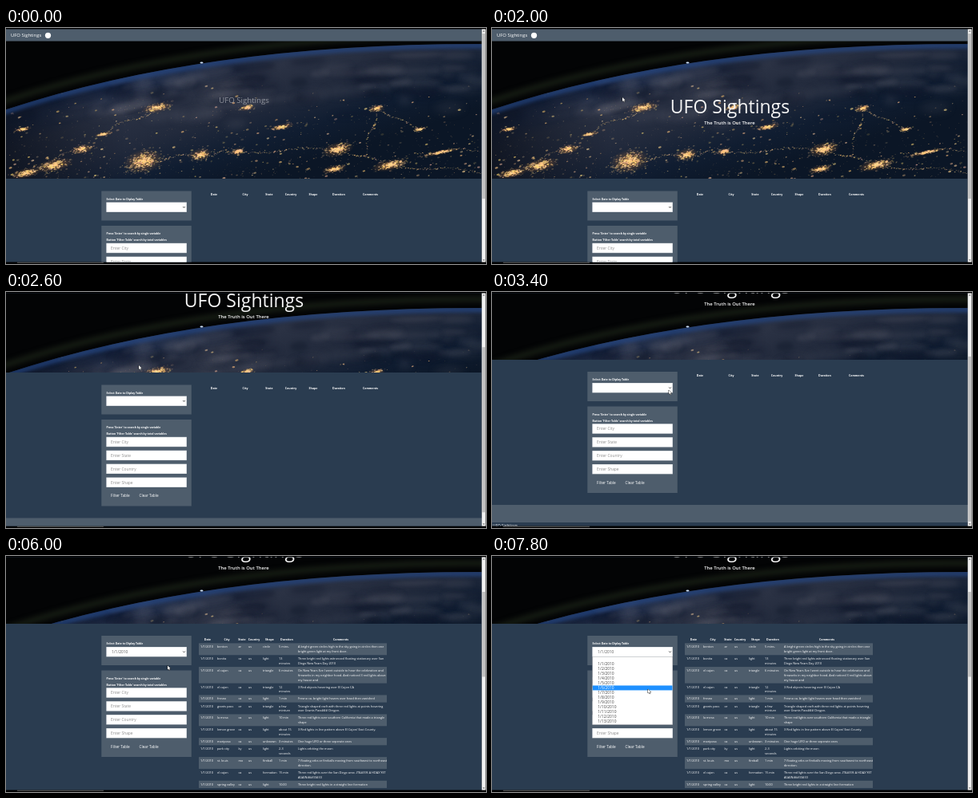
An HTML page with a canvas for the animation above (8 s loop, 600 px wide and 296 px high).

```html
<!DOCTYPE html>
<html lang="en">
<head>
<meta charset="utf-8">
<title>UFO Sightings</title>
<style>
html, body { margin: 0; width: 100%; height: 100%; overflow: hidden; background: #000; }
canvas { display: block; }
</style>
</head>
<body>
<canvas id="stage" width="600" height="296"></canvas>
<script>
const ctx = document.getElementById('stage').getContext('2d');
const LOOP = 8000, STEP = 200;
const BODY = '#2a3c50', PANEL = '#4e5d6c';
const VIEW = { top: 1.4, bottom: 293.6, right: 594.7 };
const LIST_TOP = 126.7, ROW = 5.96;

// Each key is [time, ...values].
const scrollKeys = [[2000, 0], [2200, 21], [2400, 52], [2600, 88], [2800, 104.5]];
const cursorKeys = [
  [1400, 150, 62], [2000, 163, 87], [2400, 164, 90], [2800, 168, 94], [3400, 221, 123],
  [4400, 222, 121], [5200, 202, 134.5], [6000, 202, 137.5], [6800, 204, 136],
  [7200, 221, 120], [7800, 195, 167]
];

const plainHeads = [['Date', 260], ['City', 299], ['State', 329], ['Country', 356],
  ['Shape', 384], ['Duration', 416], ['Comments', 455.5]];
const tableHeads = [['Date', 252], ['City', 276], ['State', 295], ['Country', 310],
  ['Shape', 329.5], ['Duration', 351], ['Comments', 418.5]];
const columns = [264, 290.5, 303, 321, 341, 365];

// City; state; country; shape; duration; comment. A bar marks a line break.
const sightings = [
  'benton;ar;us;circle;5 mins.;A bright green circles high in the sky going in circles then one|bright green light at my front door.',
  'bonita;ca;us;light;13|minutes;Three bright red lights witnessed floating stationary over San|Diego New Years Day 2010',
  'el cajon;ca;us;triangle;6 minutes;On New Years Eve I went outside to hear the celebration and|fireworks in my neighbor hood. And noticed 3 red lights above|my house and',
  'el cajon;ca;us;triangle;12|minutes;3 Red objects hovering over El Cajon CA',
  'fresno;ca;us;light;1 min;Fresno ca. bright light hovers over head then vanished',
  'grants pass;or;us;triangle;a few|minture;Triangle shaped craft with three red lights at points hovering|over Grants Pass### Oregon.',
  'la mesa;ca;us;light;10 min;Three red lights over southern California that made a triangle|shape',
  'lemon grove;ca;us;light;about 15|minutes;3 Red lights in line pattern above El Cajon/ East County.',
  'mariposa;ca;us;unknown;3 minutes;One huge UFO or three seperate ones',
  'park city;ky;us;light;2-3|seconds;Lights orbiting the moon',
  'st. louis;mo;us;fireball;1 min;7 floating orbs or fireballs moving from southwest to northeast|direction.',
  'el cajon;ca;us;formation;15 min;Three red lights over the San Diego area -IT&#39S A HOAX YET|AGAIN###33#33',
  'spring valley;ca;us;light;10:00;Three bright red lights in a straight line formation',
  'el cajon;ca;us;light;5 min;Three red lights in the sky'
].map(row => row.split(';').map(cell => cell.split('|')));

function track(keys, t) {
  if (t <= keys[0][0]) return keys[0].slice(1);
  for (let i = 1; i < keys.length; i++) {
    const [a, b] = [keys[i - 1], keys[i]];
    if (t <= b[0]) {
      const k = (t - a[0]) / (b[0] - a[0]);
      return a.slice(1).map((v, n) => v + (b[n + 1] - v) * k);
    }
  }
  return keys[keys.length - 1].slice(1);
}

const clamp = (v, lo, hi) => Math.min(hi, Math.max(lo, v));

function box(x, y, w, h, color, g = ctx) {
  g.fillStyle = color;
  g.fillRect(x, y, w, h);
}

// y is the visual middle of the line.
function text(str, x, y, size, { color = '#fff', weight = 400, align = 'left' } = {}) {
  ctx.font = `${weight} ${size}px "Open Sans", "Noto Sans", sans-serif`;
  ctx.textAlign = align;
  ctx.fillStyle = color;
  ctx.fillText(str, x, y + size * 0.36);
}

function seeded(seed) {
  return () => (seed = (seed * 16807) % 2147483647) / 2147483647;
}

function paintEarth() {
  const canvas = document.createElement('canvas');
  canvas.width = 600;
  canvas.height = 192;
  const g = canvas.getContext('2d');
  const rand = seeded(4711);
  const spread = () => rand() + rand() + rand() - 1.5;
  box(0, 0, 600, 192, '#030405', g);

  const horizon = dy => {
    g.beginPath();
    g.moveTo(-5, 104 + dy);
    g.quadraticCurveTo(250, 18 + dy, 605, 20 + dy);
  };
  const rim = (dy, width, color, blur) => {
    g.filter = `blur(${blur}px)`;
    horizon(dy);
    g.strokeStyle = color;
    g.lineWidth = width;
    g.stroke();
    g.filter = 'none';
  };
  rim(-11, 7, '#171d14', 3);

  g.save();
  horizon(0);
  g.lineTo(605, 192);
  g.lineTo(-5, 192);
  g.clip();
  const ground = g.createLinearGradient(250, 30, 300, 192);
  ground.addColorStop(0, '#1c2c4c');
  ground.addColorStop(0.25, '#2b3244');
  ground.addColorStop(0.5, '#222a3c');
  ground.addColorStop(0.75, '#101d31');
  ground.addColorStop(1, '#0b1626');
  box(0, 0, 600, 192, ground, g);

  for (let i = 0; i < 130; i++) {
    const x = rand() * 600, y = 88 - x * 0.035 + spread() * 36;
    g.filter = `blur(${2 + rand() * 4}px)`;
    g.fillStyle = i % 3 ? 'rgba(112,112,124,.17)' : 'rgba(8,16,34,.3)';
    g.beginPath();
    g.ellipse(x, y, 8 + rand() * 26, 2 + rand() * 5, -0.25 + x / 2400, 0, 7);
    g.fill();
  }
  g.filter = 'none';
  const shade = g.createLinearGradient(0, 0, 150, 0);
  shade.addColorStop(0, 'rgba(3,8,18,.65)');
  shade.addColorStop(1, 'rgba(3,8,18,0)');
  box(0, 0, 150, 192, shade, g);
  rim(2, 7, 'rgba(36,70,132,.7)', 2);

  const speck = (x, y, r, a) => {
    g.fillStyle = `rgba(255,${185 + rand() * 40 | 0},${105 + rand() * 60 | 0},${a})`;
    g.beginPath();
    g.ellipse(x, y, r * 1.4, r * 0.8, -0.25, 0, 7);
    g.fill();
  };
  const road = (x1, y1, x2, y2) => {
    const count = Math.hypot(x2 - x1, y2 - y1) * 0.7;
    for (let i = 0; i < count; i++) {
      const k = i / count, bend = Math.sin(k * 7) * 2.5;
      speck(x1 + (x2 - x1) * k + bend + spread(), y1 + (y2 - y1) * k + bend + spread() * 1.5,
        0.3 + rand() * 0.5, 0.15 + rand() * 0.55);
    }
  };
  // City: x, y, half width, half height.
  const cities = [[189, 100, 20, 6], [172, 167, 25, 15], [95, 152, 14, 6], [60, 172, 24, 8],
    [25, 182, 20, 6], [243, 159, 15, 8], [290, 155, 9, 5], [415, 152, 20, 9], [463, 101, 11, 5],
    [480, 172, 24, 7], [21, 127, 11, 3], [345, 124, 16, 4], [543, 156, 24, 3],
    [410, 177, 16, 5], [301, 100, 10, 4], [517, 127, 9, 3], [122, 133, 12, 3]];
  for (const [x, y, w, h] of cities) {
    g.save();
    g.translate(x, y);
    g.rotate(-0.2);
    g.scale(w, h);
    const glow = g.createRadialGradient(0, 0, 0, 0, 0, 1);
    glow.addColorStop(0, 'rgba(255,190,110,.75)');
    glow.addColorStop(0.35, 'rgba(220,140,65,.35)');
    glow.addColorStop(1, 'rgba(180,110,50,0)');
    box(-1, -1, 2, 2, glow, g);
    g.restore();
    for (let i = 0; i < w * h * 0.8 + 15; i++) {
      const angle = rand() * 6.283, reach = rand() * (0.4 + rand());
      const dx = Math.cos(angle) * reach * w;
      speck(x + dx, y + Math.sin(angle) * reach * h - dx * 0.2,
        0.4 + rand() * 0.7, clamp(1.15 - reach, 0.25, 0.95));
    }
  }
  road(10, 188, 108, 146);
  road(172, 167, 243, 159);
  road(243, 159, 290, 155);
  road(290, 155, 415, 152);
  road(415, 152, 480, 172);
  road(480, 172, 600, 182);
  road(463, 101, 450, 160);
  road(463, 101, 517, 127);
  road(189, 100, 122, 133);
  road(510, 157, 590, 153);
  for (let i = 0; i < 1000; i++) {
    const x = rand() * 600, y = 62 + Math.sqrt(rand()) * 128;
    speck(x, y, 0.25 + rand() ** 5 * 1.3, 0.12 + rand() * 0.5);
  }
  g.restore();
  g.fillStyle = '#cfe2ff';
  g.beginPath();
  g.ellipse(244.5, 43.5, 2, 1, 0, 0, 7);
  g.fill();
  return canvas;
}
const earth = paintEarth();

function drawHero(t, scroll) {
  const bottom = 189 - scroll;
  ctx.drawImage(earth, 0, 0, 600, bottom, 0, 0, 600, bottom);
  const grow = clamp(0.42 + t / 1200 * 0.58, 0, 1);
  const settle = (grow - 0.42) / 0.58;
  text('UFO Sightings', 297.5, 91 + 7.5 * settle - scroll, 23 * grow,
    { align: 'center', color: `rgba(245,245,245,${grow ** 0.8})` });
  text('The Truth is Out There', 297, 119 - scroll, 5.9,
    { align: 'center', weight: 600, color: `rgba(255,255,255,${clamp((t - 400) / 800, 0, 1)})` });
  box(0, 1 - scroll, 595, 15.5, PANEL);
  text('UFO Sightings', 6, 9 - scroll, 5.9);
  ctx.beginPath();
  ctx.arc(52.5, 9.3 - scroll, 3.6, 0, 7);
  ctx.fill();
}

function drawField(y) {
  box(125.3, y, 100.6, 12.4, '#d5d9dd');
  box(125.9, y + 0.5, 99.4, 11.4, '#fff');
}

function drawForm(scroll, chosen) {
  const label = { weight: 700 };
  ctx.save();
  ctx.translate(0, -scroll);
  box(119.3, 204.5, 112.5, 37, PANEL);
  text('Select Date to Diplay Table', 125.5, 214.3, 3.46, label);
  drawField(218.5);
  if (chosen) text('1/1/2010', 132, 224.7, 4.9, { color: '#555' });
  ctx.strokeStyle = '#222';
  ctx.lineWidth = 0.8;
  ctx.beginPath();
  ctx.moveTo(221.2, 224);
  ctx.lineTo(222.5, 225.4);
  ctx.lineTo(223.8, 224);
  ctx.stroke();

  box(119.3, 248, 112.5, 108.5, PANEL);
  text("Press 'Enter' to search by single variable", 125.5, 258, 3.4, label);
  text("Button 'Filter Table' search by total variables", 125.5, 266, 3.4, label);
  ['City', 'State', 'Country', 'Shape'].forEach((name, i) => {
    const y = 269.8 + i * 16.9;
    drawField(y);
    text('Enter ' + name, 131, y + 6.3, 4.9, { color: '#8d8d8d' });
  });
  text('Filter Table', 131, 343.7, 4.7);
  text('Clear Table', 166.5, 343.7, 4.7);
  ctx.restore();
}

function drawHeads(heads, y) {
  for (const [name, x] of heads) text(name, x, y, 3.55, { weight: 700, align: 'center' });
}

function drawTable(scroll) {
  drawHeads(tableHeads, 209 - scroll);
  let y = 213.9 - scroll;
  sightings.forEach((cells, i) => {
    const lines = Math.max(...cells.map(cell => cell.length));
    const height = 3.5 + lines * 5.67;
    if (i % 2 === 0) box(241, y, 235, height, PANEL);
    text('1/1/2010', 243, y + 4.6, 3.85);
    cells.forEach((cell, c) => cell.forEach((line, n) =>
      text(line, columns[c], y + 4.6 + n * 5.8, 3.8)));
    y += height;
  });
}

function drawList(hover) {
  box(125.3, 126, 100.7, 85.8, '#8a8f96');
  box(125.8, 126.4, 99.7, 84.9, '#fff');
  box(125.8, LIST_TOP + hover * ROW, 99.7, ROW, '#1e90ff');
  for (let i = 1; i <= 13; i++) {
    text(`1/${i}/2010`, 132.3, LIST_TOP + (i + 0.5) * ROW, 4.9, { color: i === hover ? '#fff' : '#444' });
  }
}

function drawScrollbar(scroll, pageHeight) {
  box(VIEW.right, VIEW.top, 4.9, VIEW.bottom - VIEW.top, '#f1f1f1');
  const scale = 281 / pageHeight;
  box(595.3, 7 + scroll * scale, 3.8, 293 * scale, '#c1c1c1');
  ctx.fillStyle = '#555';
  for (const [y, d] of [[4.5, -1.6], [290.5, 1.6]]) {
    ctx.beginPath();
    ctx.moveTo(595.9, y);
    ctx.lineTo(598.5, y);
    ctx.lineTo(597.2, y + d);
    ctx.fill();
  }
}

function drawCursor(x, y) {
  ctx.beginPath();
  [[0, 0], [0, 5], [1.2, 4], [2, 5.8], [2.9, 5.4], [2.1, 3.7], [3.6, 3.6]]
    .forEach(([dx, dy]) => ctx.lineTo(x + dx, y + dy));
  ctx.closePath();
  ctx.lineWidth = 0.9;
  ctx.strokeStyle = '#111';
  ctx.stroke();
  ctx.fillStyle = '#fff';
  ctx.fill();
}

function draw(t) {
  const [scroll] = track(scrollKeys, t);
  const [cx, cy] = track(cursorKeys, t);
  const chosen = t >= 6000;
  const listOpen = (t >= 4400 && t < 6000) || t >= 7200;

  box(0, 0, 600, 296, '#000');
  ctx.save();
  ctx.beginPath();
  ctx.rect(0, VIEW.top, VIEW.right, VIEW.bottom - VIEW.top);
  ctx.clip();
  box(0, 0, 600, 296, BODY);
  drawHero(t, scroll);
  drawForm(scroll, chosen);
  if (chosen) {
    drawTable(scroll);
  } else {
    drawHeads(plainHeads, 209 - scroll);
    box(0, 371.5 - scroll, 595, 22, PANEL);
    text('UFO Sightings', 1, 398 - scroll, 4.8);
  }
  if (listOpen) {
    drawList(clamp(Math.floor((cy - LIST_TOP) / ROW), chosen ? 1 : 0, 13));
  }
  ctx.restore();

  drawScrollbar(scroll, chosen ? 773 : 397.5);
  box(14, 293.8, 108, 0.8, '#777');
  if (t >= 1400) drawCursor(cx, cy);
}

function tick(now) {
  draw(Math.floor(now % LOOP / STEP) * STEP);
  requestAnimationFrame(tick);
}
draw(0);
requestAnimationFrame(tick);
</script>
</body>
</html>
```
